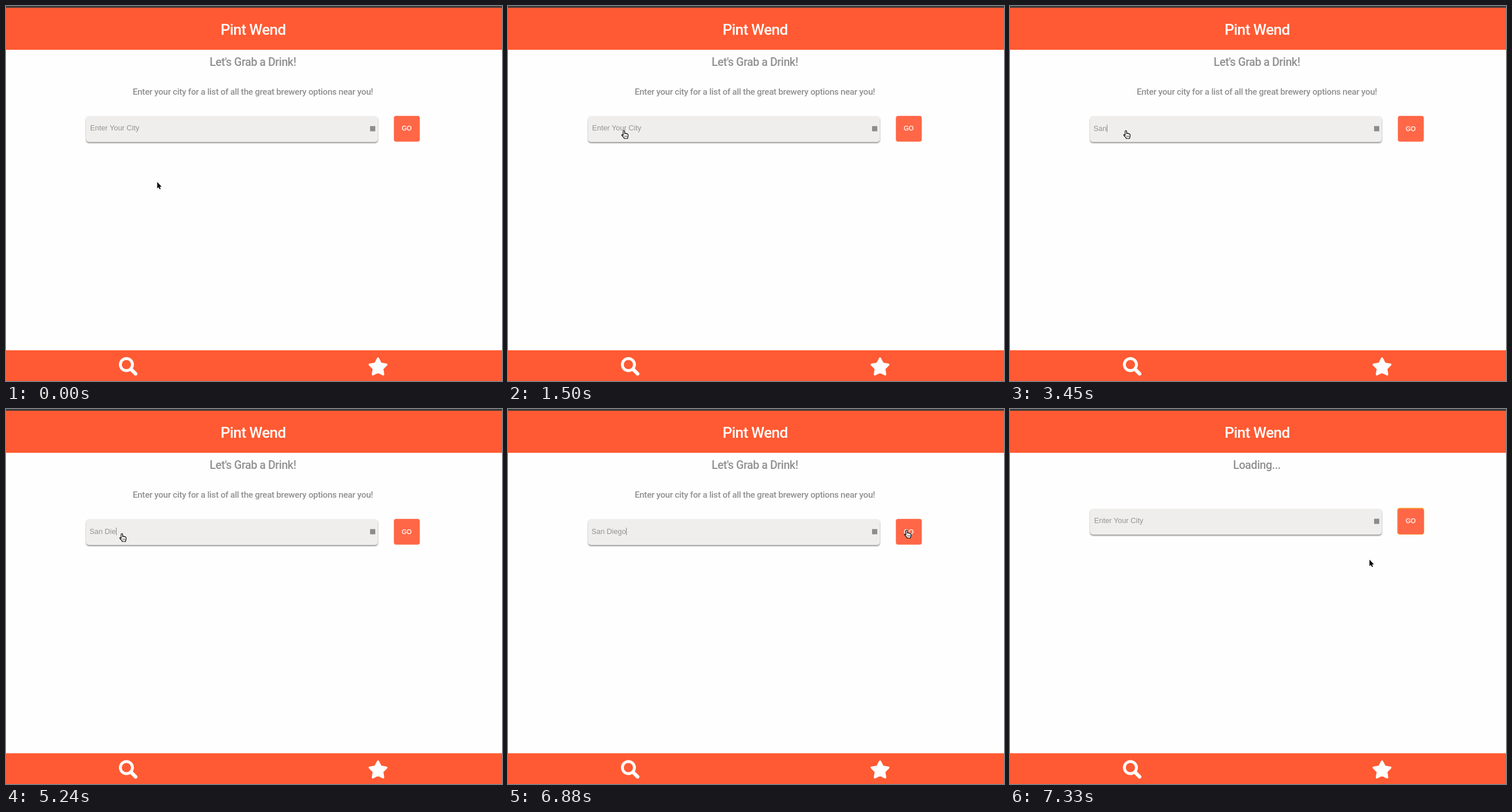
These frames come from a looping animation (861x651 px, 8000 ms). An HTML page:

```html
<!DOCTYPE html>
<html lang="en">
<head>
<meta charset="utf-8">
<title>City search</title>
<style>
  html, body { margin: 0; width: 100%; height: 100%; overflow: hidden; background: #fefefe; }
  svg { display: block; width: 100%; height: 100%; }
  text { white-space: pre; }
  .bar { fill: #ff5a33; }
  .head { font: 500 19.6px Roboto, sans-serif; letter-spacing: -.43px; fill: #919191; text-anchor: middle; }
  .sub { font-size: 15.2px; letter-spacing: -.3px; }
  .title { font-size: 26px; letter-spacing: -.6px; fill: #fff; }
  .field { fill: #efeeec; filter: drop-shadow(0 2.3px 1.3px rgba(0, 0, 0, .4)); }
  .entry { font: 12.8px "Liberation Sans", Arial, sans-serif; fill: #939393; }
  .go { font: 11px "Liberation Sans", Arial, sans-serif; fill: #fff; stroke: #fff; stroke-width: .3; text-anchor: middle; }
  .hand { fill: #fff; stroke: #000; stroke-width: 1.15; stroke-linejoin: round; }
  .arrow { fill: #000; stroke: #fff; stroke-width: 1.6; stroke-linejoin: round; paint-order: stroke; }
</style>
</head>
<body>
<svg viewBox="0 0 861 651">
  <rect width="861" height="651" fill="#fefefe"/>
  <rect class="bar" width="861" height="76"/>
  <rect width="861" height="3" fill="#39393b"/>
  <text class="head title" x="429" y="50">Pint Wend</text>
  <text class="head" id="heading" x="428.5" y="104"></text>
  <text class="head sub" id="sub" x="428.5" y="153.5">Enter your city for a list of all the great brewery options near you!</text>

  <g id="form">
    <rect class="field" x="139" y="191" width="506.5" height="45" rx="5"/>
    <text class="entry" id="entry"></text>
    <rect id="caret" y="206" width="1" height="13" fill="#858585"/>
    <rect x="632" y="208.5" width="9" height="9" fill="#8c8c8c"/>
    <rect id="ring" x="672" y="189.5" width="47" height="46.5" rx="4.5" fill="#f2b632"/>
    <rect x="673.3" y="190.8" width="45" height="44.7" rx="4" fill="#ff6747"/>
    <text class="go" id="go" x="695.5">GO</text>
  </g>

  <rect class="bar" y="597.6" width="861" height="54"/>
  <g fill="none" stroke="#fff">
    <circle cx="209" cy="622.5" r="10.5" stroke-width="5"/>
    <path d="M217 630.5 L225 638.5" stroke-width="6.2" stroke-linecap="round"/>
  </g>
  <path transform="translate(645.8 627.2) scale(.95)" fill="#fff" stroke="#fff" stroke-width="3.8" stroke-linejoin="round"
    d="M0-16.2 4.9-6.7 15.4-5 7.9 2.6 9.5 13.1 0 8.3-9.5 13.1-7.9 2.6-15.4-5-4.9-6.7Z"/>

  <path class="arrow" id="arrow" d="M0 0V11.2L2.5 8.9 4.2 12.8 6 12 4.3 8.2H7.7Z"/>
  <g class="hand" id="hand">
    <path d="M3.2 9.4V2.1Q3.2.7 4.5.7T5.8 2.1V6Q6.2 5.3 7.1 5.4T8.1 6.3Q8.5 5.8 9.3 5.9T10.2 6.8Q10.7 6.5 11.2 6.9T11.8 8.1V10.5Q11.8 12 10.9 13.3V14.5H4.8V13.4L1 9.3Q.3 8.3 1.2 7.8 2 7.4 2.6 8.2Z"/>
    <path d="M6 9.5V12M7.9 9.5V12M9.7 9.5V12" stroke-width=".7"/>
  </g>
</svg>
<script>
const LOOP = 8000, FOCUS = 1800, SUBMIT = 7030;
const HINT = 'Enter Your City';
const $ = id => document.getElementById(id);

// [start, x, y, shape]; each pose holds until the next
const poses = [
  [0, 262.5, 305.5, 'arrow'], [150, 264, 284, 'arrow'], [300, 265, 244, 'arrow'],
  [450, 260, 198, 'hand'], [600, 259, 176, 'arrow'], [750, 255, 196, 'hand'],
  [900, 251.5, 212, 'hand'], [1350, 212, 214.5, 'hand'], [1500, 196.7, 215.5, 'hand'],
  [6130, 458.7, 217.3, 'hand'], [6280, 548, 217, 'hand'], [6430, 624, 216, 'hand'],
  [6580, 670, 213, 'hand'], [6730, 686, 210, 'hand'], [6880, 687.7, 209.5, 'hand'],
  [SUBMIT, 688, 189, 'hand'], [7180, 656, 232, 'arrow'], [7330, 624, 261.5, 'arrow']
];

// [start, typed text, caret shown]
const typing = [
  [0, '', 0], [FOCUS, '', 1], [2400, '', 0], [2850, '', 1],
  [3000, 'S', 1], [3300, 'Sa', 1], [3450, 'San', 1], [3750, 'Sand', 1],
  [4200, 'San', 1], [4350, 'San ', 1], [4650, 'San D', 1], [4950, 'San Di', 1],
  [5240, 'San Die', 1], [5540, 'San Dieg', 1], [5680, 'San Diego', 1],
  [6130, 'San Diego', 0], [6730, 'San Diego', 1], [SUBMIT, '', 0]
];

const at = (list, t) => list.findLast(row => row[0] <= t);
const show = (id, on) => $(id).setAttribute('visibility', on ? 'visible' : 'hidden');
const move = (id, x, y) => $(id).setAttribute('transform', `translate(${x} ${y})`);

function draw(now) {
  const t = now % LOOP;
  const sent = t >= SUBMIT;
  const [, x, y, shape] = at(poses, t);
  const [, typed, caret] = at(typing, t);

  $('heading').textContent = sent ? 'Loading...' : "Let's Grab a Drink!";
  show('sub', !sent);
  show('ring', sent);
  move('form', 0, sent ? -18 : 0);

  const entry = $('entry');
  entry.textContent = typed || HINT;
  entry.setAttribute('x', typed ? 145 : 146);
  entry.setAttribute('y', typed ? 217 : 216);
  $('caret').setAttribute('x', 145 + (typed ? Math.round(entry.getComputedTextLength()) : 0));
  show('caret', caret);
  $('go').setAttribute('y', t >= FOCUS && !sent ? 217 : 216);

  for (const id of ['arrow', 'hand']) show(id, id === shape);
  move(shape, x, y);
}

function tick() {
  draw(performance.now());
  requestAnimationFrame(tick);
}
tick();
</script>
</body>
</html>
```
